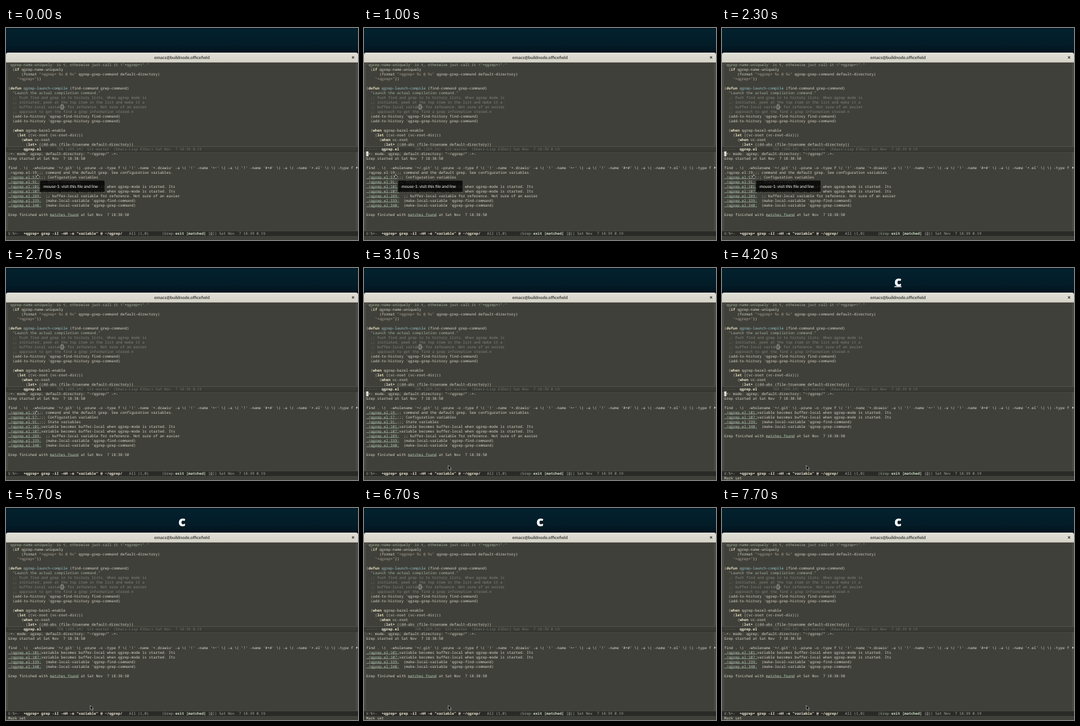
Write an HTML page with a canvas that moves like this. It is 600 px wide and 362 px high and loops after 8000 ms.

```html
<!DOCTYPE html>
<html lang="en">
<head>
<meta charset="utf-8">
<title>Grep buffer filter</title>
<style>
  html, body { margin: 0; width: 100%; height: 100%; overflow: hidden; background: #031c28; }
  canvas { display: block; width: 600px; height: 362px; }
</style>
</head>
<body>
<canvas id="stage"></canvas>
<script>
const W = 600, H = 362, LOOP = 8000;
const canvas = document.getElementById('stage');
const ctx = canvas.getContext('2d');
const ratio = window.devicePixelRatio || 1;
canvas.width = W * ratio;
canvas.height = H * ratio;

const X0 = 3.8, CELL = 3.745, Y0 = 59, ROW = 7.985;
const MONO = '"Noto Sans Mono", "DejaVu Sans Mono", monospace';
const UI = 'Lato, "Open Sans", sans-serif';
const C = {
  bg: '#40403a', fringe: '#4b4b45', text: '#d6d5c8', bright: '#f0ebd6',
  comment: '#80877b', string: '#a8a091', doc: '#a5b3a0', key: '#ece4c6', func: '#96c3c8',
  link: '#b3cbb4', good: '#d2e6cb', status: '#a9b2a3', faint: '#6f766c',
  active: '#2a2a27', idle: '#3a3a35', edge: '#62625b'
};

// A run is [text, colour, bold, underlined].
const t = s => [s, C.text];
const key = s => [s, C.key, true];
const com = s => [s, C.comment];
const str = s => [s, C.string];
const doc = s => [s, C.doc];
const mode = s => [s, C.status];
const link = s => [s, C.link, false, true];

const code = [
  [doc("'qgrep-name-uniquely' is t, otherwise just call it \\\"*qgrep*\\\".\"")],
  [t('  ('), key('if'), t(' qgrep-name-uniquely')],
  [t('      (format '), str('"*qgrep* %s @ %s"'), t(' qgrep-grep-command default-directory)')],
  [str('    "*qgrep*"'), t('))')],
  [],
  [t('('), key('defun'), [' qgrep-launch-compile', C.func], t(' (find-command grep-command)')],
  [doc('  "Launch the actual compilation command."')],
  [com('  ;; Push find and grep in to history lists. When qgrep mode is')],
  [com('  ;; initiated, peek at the top item in the list and make it a')],
  [com('  ;; buffer-local variable for reference. Not sure of an easier')],
  [com('  ;; approach to get the find a grep information stored.n')],
  [t("  (add-to-history 'qgrep-find-history find-command)")],
  [t("  (add-to-history 'qgrep-grep-history grep-command)")],
  [],
  [t('  ('), key('when'), t(' qgrep-bazel-enable')],
  [t('    ('), key('let'), t(' ((vc-root (vc-root-dir)))')],
  [t('      ('), key('when'), t(' vc-root')],
  [t('        ('), key('let*'), t(' ((dd-abs (file-truename default-directory))')],
  [['-:---  ', C.faint], ['qgrep.el', C.bright, true],
   ['       76% (289,24)  Git-master  (Emacs-Lisp ElDoc) Sat Nov  7 18:39 0.19', C.faint]]
];

const head = [
  [t('-*- mode: qgrep; default-directory: "~/qgrep/" -*-')],
  [t('Grep started at Sat Nov  7 18:38:50')],
  [],
  [t("find . \\(  -wholename '*/.git' \\) -prune -o -type f \\( '!' -name '*.drawio' -a \\( '!' -name '*~' \\)" +
     " -a \\( '!' -name '#*#' \\) -a \\( -name '*.el' \\) \\) -type f")]
];

const hit = (line, text) => [link('./qgrep.el:' + line + ':'), t(text)];
const hits = [
  hit(19, ';; command and the default grep. See configuration variables.'),
  hit(57, ';;; Configuration variables'),
  hit(91, ';;; State variables'),
  hit(101, 'variable becomes buffer-local when qgrep-mode is started. Its'),
  hit(107, 'variable becomes buffer-local when qgrep-mode is started. Its'),
  hit(289, '  ;; buffer-local variable for reference. Not sure of an easier'),
  hit(339, "  (make-local-variable 'qgrep-find-command)"),
  hit(340, "  (make-local-variable 'qgrep-grep-command)")
];
const kept = [hits[3], hits[4], hits[6], hits[7]];
// A hovered hit loses its link style.
const hovered = [hits[0].map(([text]) => t(text)), ...hits.slice(1)];
const done = [t('Grep finished with '), link('matches found'), t(' at Sat Nov  7 18:38:50')];

const status = [
  mode('U:%*-  '), ['*qgrep* grep -iI -nH -e "variable" @ ~/qgrep/', C.bright, true],
  mode('   All (1,0)      (Grep:'), ['exit [matched]', C.good, true], mode(' ['),
  ['0', C.status, false, true], mode(']) Sat Nov  7 18:39 0.19')
];

function box(x, y, w, h, color) {
  ctx.fillStyle = color;
  ctx.fillRect(x, y, w, h);
}

function label(text, x, y, font, color, align = 'left') {
  ctx.font = font;
  ctx.fillStyle = color;
  ctx.textAlign = align;
  ctx.fillText(text, x, y);
}

const colX = col => X0 + col * CELL;
const rowY = row => Y0 + row * ROW;

function drawLine(row, runs) {
  const base = rowY(row) + 6.15;
  let col = 0;
  for (const [text, color, bold, under] of runs) {
    ctx.font = (bold ? '700 ' : '400 ') + '6.24px ' + MONO;
    ctx.fillStyle = color;
    ctx.textAlign = 'left';
    [...text].forEach((ch, i) => {
      // Asterisks sit at mid height.
      if (ch !== ' ') ctx.fillText(ch, colX(col + i), base + (ch === '*' ? 1.1 : 0));
    });
    if (under) ctx.fillRect(colX(col), base + 0.7, text.length * CELL, 0.5);
    col += text.length;
  }
}

const drawLines = (row, lines) => lines.forEach((runs, i) => drawLine(row + i, runs));

function drawDesktop() {
  const g = ctx.createLinearGradient(0, 0, 0, 42);
  g.addColorStop(0, '#03212e');
  g.addColorStop(0.7, '#031c28');
  g.addColorStop(1, '#02141c');
  box(0, 0, W, 60, g);
  box(0, 0, W, 0.7, '#010a0e');
}

function drawTitle() {
  const g = ctx.createLinearGradient(0, 42, 0, 59);
  g.addColorStop(0, '#e1dfd6');
  g.addColorStop(1, '#d5d2c8');
  ctx.fillStyle = g;
  ctx.beginPath();
  ctx.roundRect(0, 42, W, 17, [3.5, 3.5, 0, 0]);
  ctx.fill();
  box(0, 58.4, W, 0.6, '#a8a59c');
  label('emacs@buildnode.officefield', 300, 52.8, '700 7.4px ' + UI, '#3c3d39', 'center');
  ctx.strokeStyle = '#3c3d39';
  ctx.lineWidth = 1.1;
  ctx.beginPath();
  ctx.moveTo(589.8, 48.4); ctx.lineTo(593.4, 52);
  ctx.moveTo(593.4, 48.4); ctx.lineTo(589.8, 52);
  ctx.stroke();
}

// A mode line is a raised bar: light upper edge, dark lower edge.
function drawBar(row, color) {
  const y = rowY(row);
  box(0, y - 0.5, W, ROW + 0.7, color);
  box(0, y - 0.5, W, 0.6, C.edge);
  box(0, y + ROW - 0.3, W, 0.5, '#1f1f1d');
}

function drawPanes() {
  box(0, Y0, W, H - Y0, C.bg);
  box(0, Y0, 3.5, 36 * ROW, C.fringe);
  box(W - 3.5, Y0, 3.5, 36 * ROW, C.fringe);
  drawBar(18, C.idle);
  drawBar(36, C.active);
}

function drawTooltip() {
  ctx.fillStyle = 'rgba(0,0,0,0.8)';
  ctx.beginPath();
  ctx.roundRect(58, 260.5, 110, 20, 2);
  ctx.fill();
  label('mouse-1: visit this file and line', 64, 272.9, '400 7px ' + UI, '#f2f2ec');
}

function shape(x, y, points) {
  ctx.beginPath();
  points.forEach(([dx, dy]) => ctx.lineTo(x + dx, y + dy));
  ctx.closePath();
  ctx.lineJoin = 'round';
  ctx.strokeStyle = '#f4f4f2';
  ctx.lineWidth = 1;
  ctx.stroke();
  ctx.fillStyle = '#161615';
  ctx.fill();
}

const ARROW = [[0, 0], [0, 7.2], [1.7, 5.7], [2.9, 8.3], [4, 7.8], [2.8, 5.3], [5, 5.1]];
const HAND = [[-0.4, -2.6], [0.4, -2.6], [0.4, -0.6], [2.4, -0.1], [2.4, 1.6], [1.8, 2.8], [-0.6, 2.8], [-1.9, 0.7], [-0.4, 0.8]];

function drawIBeam(x, y) {
  ctx.lineCap = 'butt';
  for (const [color, width] of [['#f4f4f2', 1.8], ['#161615', 0.7]]) {
    ctx.strokeStyle = color;
    ctx.lineWidth = width;
    ctx.beginPath();
    ctx.moveTo(x - 1.6, y - 3.6); ctx.lineTo(x + 1.6, y - 3.6);
    ctx.moveTo(x, y - 3.6); ctx.lineTo(x, y + 3.6);
    ctx.moveTo(x - 1.6, y + 3.6); ctx.lineTo(x + 1.6, y + 3.6);
    ctx.stroke();
  }
}

function drawPointer(ms) {
  if (ms < 2700) return shape(53.8, 253, HAND);
  if (ms < 2800) return shape(52, 246.6, HAND);
  if (ms >= 3100) return shape(144, 337, ARROW);
  // The pointer travels in 100 ms steps, easing in and out.
  const u = (Math.floor(ms / 100) - 27) / 4;
  const e = u * u * (3 - 2 * u);
  drawIBeam(52 + 92 * e, 247 + 90 * e);
}

function cursorOn(ms) {
  if (ms < 100) return false;
  if (ms < 4200) return ms < 500 || Math.floor(ms / 500) % 2 === 0;
  return Math.floor((ms - 4200) / 500) % 2 === 0;
}

function drawCursor() {
  box(colX(0), rowY(19), CELL, ROW, '#efede2');
  drawLine(19, [['-', C.bg]]);
}

function drawKey(ms) {
  label('c', 300, 30.7, '800 23px "Open Sans", sans-serif', '#ffffff', 'center');
  if (ms < 4300) box(293.8, 31.2, 12.2, 1.4, '#ffffff');
}

function draw(ms) {
  const filtered = ms >= 4200;
  const hover = ms < 2700;
  ctx.setTransform(ratio, 0, 0, ratio, 0, 0);
  ctx.textBaseline = 'alphabetic';
  ctx.textRendering = 'geometricPrecision';

  drawDesktop();
  drawTitle();
  drawPanes();

  drawLines(0, code);
  ctx.strokeStyle = '#e4e2d8';
  ctx.lineWidth = 0.6;
  ctx.strokeRect(colX(24) + 0.2, rowY(9) + 0.2, CELL - 0.2, ROW - 0.4);

  const found = filtered ? kept : hover ? hovered : hits;
  drawLines(19, head);
  drawLines(23, found);
  drawLine(24 + found.length, done);
  drawLine(36, status);
  if (filtered) drawLine(37, [t('Mark set')]);

  // Continuation mark in the right fringe.
  ctx.fillStyle = C.text;
  ctx.beginPath();
  ctx.moveTo(597, 236.6);
  ctx.lineTo(599.7, 238.6);
  ctx.lineTo(597, 240.6);
  ctx.fill();

  if (cursorOn(ms)) drawCursor();
  if (hover) drawTooltip();
  drawPointer(ms);
  if (filtered) drawKey(ms);
}

const start = performance.now();
function tick() {
  draw((performance.now() - start) % LOOP);
  requestAnimationFrame(tick);
}
tick();
</script>
</body>
</html>
```
